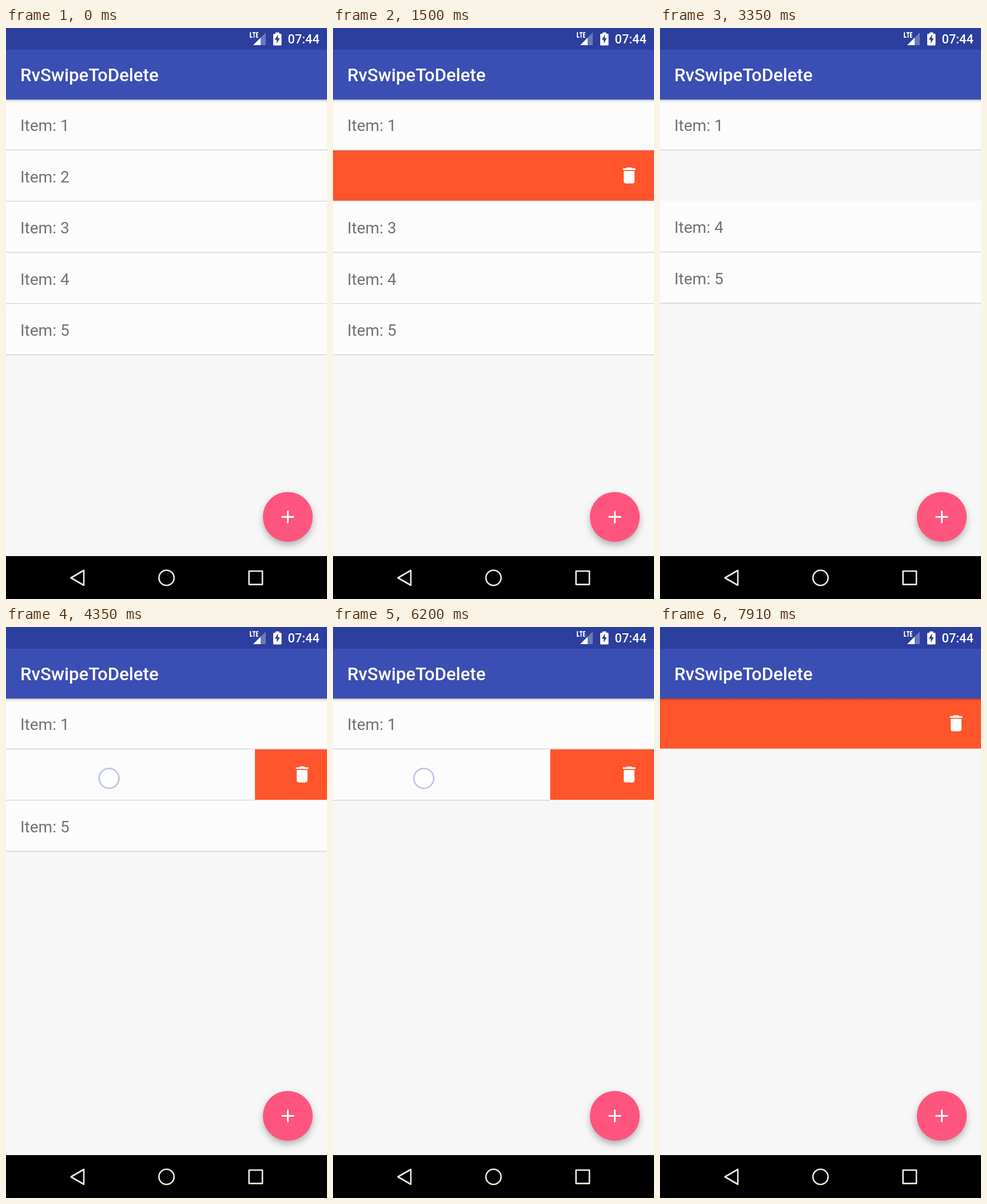
Write an HTML page with a canvas that moves like this. It is 561 by 998 pixels and loops after 8000 ms.

```html
<!DOCTYPE html>
<html lang="en">
<head>
<meta charset="utf-8">
<title>RvSwipeToDelete</title>
<style>
  html, body { margin: 0; width: 100%; height: 100%; overflow: hidden; background: #000; }
  canvas { display: block; width: 561px; height: 998px; }
</style>
</head>
<body>
<canvas id="stage" width="561" height="998"></canvas>
<script>
const ctx = document.getElementById('stage').getContext('2d');
const W = 561, LOOP = 8000, STEP = 71.25;
const LIST_TOP = 124.5, PITCH = 89.5, ROW_H = 88;
const SETTLE = 250;
const FONT = 'Roboto, sans-serif';

// down: touch starts, up: finger released, gone: row removed, shift: rows below start moving.
// x/y: first touch point, drag: distance at release, power: shape of the drag.
const swipes = [
  { item: 2, down: 500, up: 1245, gone: 1780, shift: 1740, x: 372, y: 265, drag: 117, power: 1.2 },
  { item: 3, down: 2280, up: 2945, gone: 3350, shift: 3340, x: 365, y: 265, drag: 209, power: 1.3 },
  { item: 4, down: 3990, up: 4735, gone: 5130, shift: 5120, x: 306, y: 265, drag: 209, power: 0.7 },
  { item: 5, down: 5630, up: 6440, gone: 6910, shift: 6900, x: 340, y: 265, drag: 265, power: 1.1 },
  { item: 1, down: 7120, up: 7655, gone: Infinity, shift: Infinity, x: 350, y: 175, drag: 200, power: 1.2 }
];

const trash = new Path2D('M6 19c0 1.1.9 2 2 2h8c1.1 0 2-.9 2-2V7H6v12zM19 4h-3.5l-1-1h-5l-1 1H5v2h14V4z');
const lte = new Path2D('M427.2 7.5V16.2H430.6M430.8 8.3H436.2M433.5 8V17M441 8.3H437.8V16.2H441M437.8 12.2H440.6');
const bolt = new Path2D('M475.3 11.5L469.8 20.6H473.2V27L478.5 17.9H475.3Z');

const clamp01 = v => Math.max(0, Math.min(1, v));
const ease = v => 0.5 - Math.cos(Math.PI * clamp01(v)) / 2;

function rect(color, x, y, w, h) {
  ctx.fillStyle = color;
  ctx.fillRect(x, y, w, h);
}

function text(str, x, y, size, weight, color) {
  ctx.font = `${weight} ${size}px ${FONT}`;
  ctx.fillStyle = color;
  ctx.fillText(str, x, y);
}

function polygon(points) {
  ctx.beginPath();
  points.forEach(([x, y]) => ctx.lineTo(x, y));
  ctx.closePath();
}

function circle(x, y, r) {
  ctx.beginPath();
  ctx.arc(x, y, r, 0, Math.PI * 2);
}

function swipeOffset(s, t) {
  if (t < s.down) return 0;
  if (t >= s.up) return s.drag + (W - s.drag) * ease((t - s.up) / SETTLE);
  const d = s.drag * Math.pow((t - s.down) / (s.up - s.down), s.power);
  return d < 12 ? 0 : d;
}

function drawRow(item, y, offset) {
  if (offset > 0) {
    rect('#ff542c', 0, y, W, ROW_H);
    ctx.save();
    ctx.translate(498.8, y + 25);
    ctx.scale(1.558, 1.558);
    ctx.fillStyle = '#fff';
    ctx.fill(trash);
    ctx.restore();
  }
  rect('#fcfcfd', -offset, y, W, ROW_H);
  rect('#d5d5d5', -offset, y + ROW_H, W, 1.5);
  text('Item: ' + item, 25 - offset, y + 55.5, 28, 400, '#727272');
}

function drawList(t) {
  for (let item = 1; item <= 5; item++) {
    const swipe = swipes.find(s => s.item === item);
    if (t >= swipe.gone) continue;
    let slot = item - 1;
    for (const s of swipes) {
      if (s.item < item && t >= s.gone) slot -= ease((t - s.shift) / SETTLE);
    }
    drawRow(item, LIST_TOP + slot * PITCH, swipeOffset(swipe, t));
  }
}

function drawStatusBar() {
  rect('#2c3e9e', 0, 0, W, 38);
  ctx.strokeStyle = '#fff';
  ctx.lineWidth = 1.7;
  ctx.stroke(lte);
  polygon([[454, 8], [454, 30], [432, 30]]);
  ctx.fillStyle = 'rgba(255,255,255,.3)';
  ctx.fill();
  rect('#2c3e9e', 430, 8, 12.5, 10);
  ctx.stroke(lte);
  polygon([[445, 17], [445, 30], [432, 30]]);
  ctx.fillStyle = '#fff';
  ctx.fill();

  ctx.beginPath();
  ctx.roundRect(467, 10, 14.5, 20.5, 1.5);
  ctx.fill();
  rect('#fff', 471, 7.7, 6.5, 3);
  ctx.fillStyle = '#2c3e9e';
  ctx.fill(bolt);
  text('07:44', 492.5, 27, 21.8, 500, '#fff');
}

function drawToolbar() {
  const shade = ctx.createLinearGradient(0, 125, 0, 131);
  shade.addColorStop(0, 'rgba(0,0,0,.27)');
  shade.addColorStop(0.4, 'rgba(0,0,0,.08)');
  shade.addColorStop(1, 'rgba(0,0,0,0)');
  rect(shade, 0, 125, W, 6);
  rect('#3b4eb4', 0, 38, W, 87);
  text('RvSwipeToDelete', 25, 93, 31.2, 500, '#fff');
}

function drawAddButton() {
  ctx.save();
  ctx.shadowColor = 'rgba(0,0,0,.28)';
  ctx.shadowBlur = 12;
  ctx.shadowOffsetY = 6;
  circle(492.5, 854.5, 43.6);
  ctx.fillStyle = '#fe557f';
  ctx.fill();
  ctx.restore();
  rect('#fff', 481.6, 853, 21.8, 3);
  rect('#fff', 491, 843.6, 3, 21.8);
}

function drawNavBar() {
  rect('#000', 0, 923, W, 75);
  ctx.strokeStyle = '#ececec';
  ctx.lineWidth = 2.6;
  ctx.lineJoin = 'round';
  polygon([[113.5, 961], [136, 948], [136, 974]]);
  ctx.stroke();
  circle(280.5, 961, 13.2);
  ctx.stroke();
  ctx.strokeRect(424.7, 949.2, 23.4, 23.4);
}

function drawTouch(t) {
  const s = swipes.find(s => t >= s.down && t < s.up);
  if (!s) return;
  const d = s.drag * Math.pow((t - s.down) / (s.up - s.down), s.power);
  circle(s.x - d, s.y - 0.5, 17.3);
  ctx.fillStyle = 'rgba(255,255,255,.45)';
  ctx.fill();
  ctx.strokeStyle = 'rgba(120,135,215,.22)';
  ctx.lineWidth = 3.4;
  ctx.stroke();
  ctx.strokeStyle = 'rgba(135,148,218,.5)';
  ctx.lineWidth = 1.6;
  ctx.stroke();
}

function draw(t) {
  rect('#f7f7f8', 0, 0, W, 998);
  drawList(t);
  drawToolbar();
  drawStatusBar();
  drawAddButton();
  drawNavBar();
  drawTouch(t);
}

function tick() {
  const t = performance.now() % LOOP;
  draw(Math.floor((t + 5) / STEP) * STEP + 5);
  requestAnimationFrame(tick);
}
tick();
</script>
</body>
</html>
```
